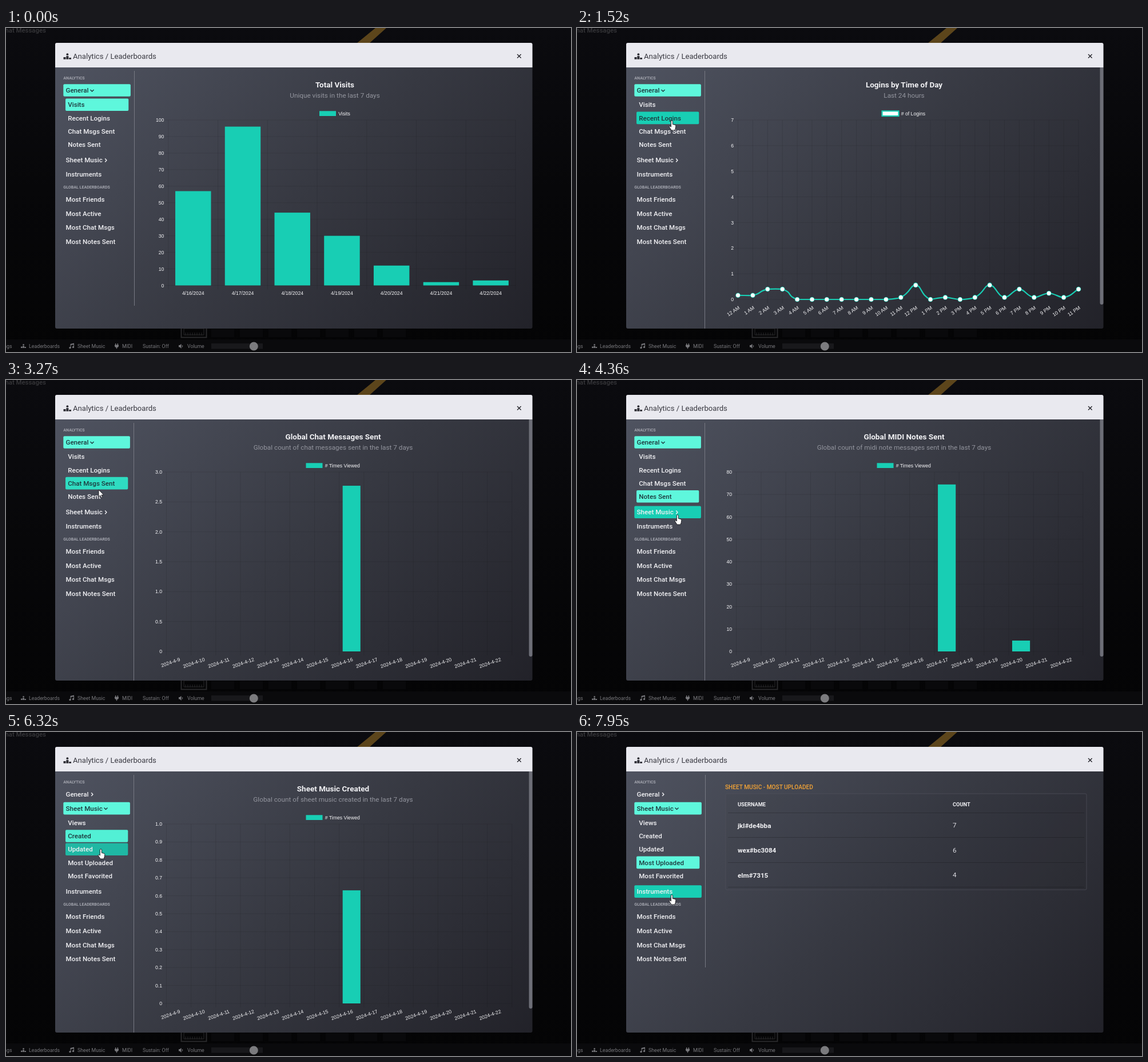
An HTML page that plays this animation: 988 by 567 pixels, repeating every 8 s.

```html
<!DOCTYPE html>
<html lang="en">
<head>
<meta charset="utf-8">
<title>Analytics / Leaderboards</title>
<style>
  html, body { margin: 0; width: 100%; height: 100%; overflow: hidden; background: #060608; }
  svg { display: block; width: 100%; height: 100%; }
  text { font-family: Roboto, sans-serif; white-space: pre; }
  .chart text { font-family: "Liberation Sans", Arial, sans-serif; font-size: 8.7px; fill: #f4f4f6; }
  .bar text { font-size: 8.8px; fill: #77777b; }
</style>
</head>
<body>
<svg viewBox="0 0 988 567">
  <defs>
    <linearGradient id="room" x2="0" y2="1">
      <stop offset="0" stop-color="#0b0b0f"/>
      <stop offset=".5" stop-color="#070709"/>
      <stop offset="1" stop-color="#040405"/>
    </linearGradient>
    <linearGradient id="body" gradientUnits="userSpaceOnUse" x1="180" y1="-26" x2="826" y2="621">
      <stop offset="0" stop-color="#4f5360"/>
      <stop offset=".5" stop-color="#373942"/>
      <stop offset="1" stop-color="#222229"/>
    </linearGradient>
    <symbol id="podium" viewBox="0 0 14 11" overflow="visible">
      <circle cx="7.1" cy="2" r="2"/>
      <path d="M5 5h4.2v6H5zM0 7h4.2v4H0zM10 8h4v3h-4z"/>
    </symbol>
  </defs>

  <rect width="988" height="567" fill="url(#room)"/>
  <path d="M613 27L646 0H665L635 27Z" fill="#5c451b"/>
  <text x="70" y="8" text-anchor="end" font-size="11.4" font-weight="500" fill="#38383b">Chat Messages</text>

  <g fill="none" stroke="#29292b">
    <rect x="306.5" y="520.5" width="44" height="21" stroke-width="2"/>
    <rect x="311" y="526" width="35" height="11" stroke-width="1"/>
    <path d="M314 538v-5m4 5v-5m4 5v-5m4 5v-5m4 5v-5m4 5v-5m4 5v-5m4 5v-5"/>
  </g>
  <path d="M359 534h40m10 0h40m10 0h40m10 0h40m10 0h40m10 0h40m10 0h40" stroke="#09090b" stroke-width="14"/>

  <g class="bar">
    <rect y="545" width="988" height="22" fill="#0a0a0c"/>
    <text x="10.5" y="560" text-anchor="end">Chat Msgs</text>
    <use href="#podium" x="26" y="553" width="9" height="7" fill="#77777b"/>
    <text x="40" y="560">Leaderboards</text>
    <g fill="#77777b">
      <path d="M112.5 553l6.5-1.6v7h-1v-4.400l-4.500 1.100v4.500h-1z"/>
      <circle cx="112" cy="559.6" r="1.700"/><circle cx="117.500" cy="558.400" r="1.700"/>
      <path d="M191 552h1.300v2.500h2.400V552h1.300v2.500h1v2q0 2.300-2.800 2.800v2h-1.400v-2q-2.800-.5-2.800-2.800v-2h1z"/>
      <path d="M302 555h2l2.500-2.300v8.200l-2.500-2.300h-2z"/>
    </g>
    <path d="M308 555q1.500 1.800 0 3.600" fill="none" stroke="#77777b"/>
    <text x="125" y="560">Sheet Music</text>
    <text x="203" y="560">MIDI</text>
    <text x="239" y="560">Sustain: Off</text>
    <text x="317" y="560">Volume</text>
    <rect x="359" y="552" width="90" height="9.500" fill="#18181b"/>
    <circle cx="433.300" cy="557" r="7.500" fill="#7b7b7e"/>
  </g>

  <rect x="86" y="26" width="834.500" height="500" rx="3" fill="url(#body)"/>
  <path d="M86 69V29q0-3 3-3H917.500q3 0 3 3V69z" fill="#e9e9ef"/>
  <use href="#podium" x="100.500" y="44" width="13.500" height="11" fill="#2c2c33"/>
  <text x="117" y="54.200" font-size="13.130" fill="#3a3a42">Analytics / Leaderboards</text>
  <path d="M894 46l6.600 6.600m0-6.600l-6.600 6.600" stroke="#26262c" stroke-width="1.400"/>
  <g id="live"></g>
</svg>

<script>
const LOOP = 8000, STEP = 108.9;
const MINT = [94, 247, 220], TEAL = [24, 206, 180];
const TOP = 161, live = document.getElementById('live');

const days = Array.from({ length: 14 }, (_, i) => `2024-4-${9 + i}`);
const hours = Array.from({ length: 24 }, (_, i) => `${i % 12 || 12} ${i < 12 ? 'AM' : 'PM'}`);
const week = Array.from({ length: 7 }, (_, i) => `4/${16 + i}/2024`);

const daily = (left, max, tick, bars) => ({
  left, max, tick, bars, right: 884.8, base: 475, labels: days, turn: -19,
  legend: '# Times Viewed', legendX: 524.5
});

const views = [
  { at: -2000, group: 'General', item: 'Visits', title: 'Total Visits', sub: 'Unique visits in the last 7 days',
    divider: 486, wide: true,
    chart: { left: 283.9, right: 891, base: 450.5, max: 100, tick: 10, labels: week, turn: 0,
      bars: { 0: 57, 1: 96, 2: 44, 3: 30, 4: 12, 5: 2, 6: 3 }, legend: 'Visits', legendX: 548 } },
  { at: 1504, group: 'General', item: 'Recent Logins', title: 'Logins by Time of Day', sub: 'Last 24 hours',
    chart: { left: 281.5, right: 877, base: 475, max: 7, tick: 1, labels: hours, turn: -34,
      line: [...'225500000001701017151315'].map(Number), legend: '# of Logins', legendX: 533.5 } },
  { at: 2793, group: 'General', item: 'Chat Msgs Sent', title: 'Global Chat Messages Sent',
    sub: 'Global count of chat messages sent in the last 7 days', chart: daily(280.5, 3, .5, { 7: 3 }) },
  { at: 3783, group: 'General', item: 'Notes Sent', title: 'Global MIDI Notes Sent',
    sub: 'Global count of midi note messages sent in the last 7 days', chart: daily(278.6, 80, 10, { 8: 77, 11: 5 }) },
  { at: 5013, group: 'Sheet Music', item: 'Views', title: 'Sheet Music Views',
    sub: 'Global views in the last 7 days', chart: daily(273.5, 7, 1, { 7: 7, 8: 6, 9: 1, 11: 3, 12: 1, 13: 2 }) },
  { at: 6096, group: 'Sheet Music', item: 'Created', title: 'Sheet Music Created',
    sub: 'Global count of sheet music created in the last 7 days', chart: daily(280.5, 1, .1, { 7: 1 }) },
  { at: 6620, group: 'Sheet Music', item: 'Updated', title: 'Sheet Music Updated',
    sub: 'Global count of sheet music updated in the last 7 days', chart: daily(280.5, 1, .1, { 7: 1, 12: 1 }) },
  { at: 7300, group: 'Sheet Music', item: 'Most Uploaded', divider: 412, wide: true,
    table: [['jkl#de4bba', 7], ['wex#bc3084', 6], ['elm#7315', 4]] }
];

const menu = {
  General: ['Visits', 'Recent Logins', 'Chat Msgs Sent', 'Notes Sent'],
  'Sheet Music': ['Views', 'Created', 'Updated', 'Most Uploaded', 'Most Favorited'],
  Instruments: []
};
const boards = ['Most Friends', 'Most Active', 'Most Chat Msgs', 'Most Notes Sent'];

// Pointer path: time, x, y
const path = [
  [0, 54, 580], [110, 54, 566], [430, 90, 450], [870, 128, 330], [1200, 150, 225], [1420, 166, 162],
  [2300, 167, 163], [2600, 164, 178], [3150, 163, 189], [3267, 162, 192], [3500, 162, 200],
  [3900, 163, 204], [4250, 176, 234], [4350, 176, 236], [5340, 176, 236], [5900, 166, 184],
  [6150, 166, 184], [6316, 166, 205], [6700, 166, 206], [7100, 166, 227], [7450, 166, 228],
  [7780, 166, 285], [8000, 166, 285]
];

function pointer(t) {
  const i = Math.max(1, path.findIndex(p => p[0] >= t));
  const [t0, x0, y0] = path[i - 1], [t1, x1, y1] = path[i];
  const u = Math.max(0, (t - t0) / (t1 - t0)), e = u * u * (3 - 2 * u);
  return [x0 + (x1 - x0) * e, y0 + (y1 - y0) * e];
}

const viewAt = t => views.findLast(v => v.at <= t);

function rowsFor(group) {
  const rows = [];
  let y = 109;
  for (const [label, kids] of Object.entries(menu)) {
    rows.push({ label, y, parent: kids.length > 0 });
    if (label === group) {
      kids.forEach((kid, i) => rows.push({ label: kid, y: y + 25.2 + i * 23.2, child: true }));
      y += 4.9 + kids.length * 23.2;
    }
    y += 24.6;
  }
  rows.push({ heading: 'GLOBAL LEADERBOARDS', y: y - 2 });
  boards.forEach((label, i) => rows.push({ label, y: y + 19.6 + i * 24.6 }));
  return rows;
}

function hit(t) {
  const [x, y] = pointer(t);
  if (x < 100 || x > 217) return null;
  const row = rowsFor(viewAt(t).group).find(r => r.label && Math.abs(r.y - y) < 10.8);
  return row ? row.label : null;
}

// Hover fades over 100 ms: share of recent moments spent on the row
function hoverLevel(label, t) {
  let n = 0;
  for (let k = 0; k < 6; k++) if (hit(t - k * 20) === label) n++;
  return n / 6;
}

const text = (x, y, s, size, fill, extra = '') =>
  `<text x="${x}" y="${y + size * .355}" font-size="${size}" fill="${fill}" ${extra}>${s}</text>`;
const rect = (x, y, w, h, fill, extra = '') =>
  `<rect x="${x}" y="${y}" width="${w}" height="${h}" fill="${fill}" ${extra}/>`;
const mix = (a, b, u) => `rgb(${a.map((v, i) => Math.round(v + (b[i] - v) * u))})`;
const MID = 'text-anchor="middle"', END = 'text-anchor="end"';

function sidebar(view, t) {
  const cut = view.wide ? 0 : 1;
  let out = text(100.3, 87, 'ANALYTICS', 7.1, '#a3a5ae', 'font-weight="700"');
  for (const r of rowsFor(view.group)) {
    if (r.heading) {
      out += text(100.3, r.y, r.heading, 7.1, '#a3a5ae', 'font-weight="700"');
      continue;
    }
    const active = r.label === view.group || r.label === view.item;
    const h = hoverLevel(r.label, t), x = r.child ? 104 : 100.3;
    const w = (r.child ? 110.3 : 117.6) - cut, ink = active ? '#1d383d' : '#f1f1f4';
    if (active || h) {
      out += rect(x, r.y - 10.8, w, 21.6, active ? mix(MINT, TEAL, h) : mix(TEAL, TEAL, 0),
        `rx="2" opacity="${active ? 1 : h}"`);
    }
    out += text(x + 4.2, r.y, r.label, 11.6, ink, 'font-weight="500"');
    if (r.parent) {
      const cx = r.label === 'General' ? 150.5 : 174.5;
      const d = active ? `M${cx - 3} ${r.y - 1}l3 3 3-3` : `M${cx - 1.3} ${r.y - 2.700}l2.700 2.900-2.700 2.900`;
      out += `<path d="${d}" fill="none" stroke="${ink}" stroke-width="1.400"/>`;
    }
  }
  const end = view.divider || 526;
  out += rect(224 - cut, 75, 1, end - 75, '#777983');
  if (cut) out += `<path d="M914.500 69h6v412q0 3-3 3t-3-3z" fill="#6d6e77"/>`;
  return out;
}

function curve(c, p) {
  const step = (c.right - c.left) / (c.line.length - 1);
  const pts = c.line.map((v, i) => [c.left + i * step, c.base - v / c.max * (c.base - TOP)]);
  const put = ([x, y]) => `${x.toFixed(1)} ${(c.base - (c.base - Math.min(c.base, Math.max(TOP, y))) * p).toFixed(2)}`;
  const ctrl = pts.map((b, i) => {
    const a = pts[i - 1] || b, n = pts[i + 1] || b;
    const d0 = Math.hypot(b[0] - a[0], b[1] - a[1]), d1 = Math.hypot(n[0] - b[0], n[1] - b[1]);
    const k = .4 / (d0 + d1);
    return [-d0, d1].map(d => [0, 1].map(j => b[j] + k * d * (n[j] - a[j])));
  });
  let d = 'M' + put(pts[0]);
  for (let i = 1; i < pts.length; i++) d += `C${put(ctrl[i - 1][1])} ${put(ctrl[i][0])} ${put(pts[i])}`;
  const dots = pts.map(q => `<path d="M${put(q)}h0"/>`).join('');
  return `<path d="${d}" fill="none" stroke="#18ceb4" stroke-width="2.200"/>
    <g stroke-linecap="round" stroke="#18ceb4" stroke-width="8.600">${dots}</g>
    <g stroke-linecap="round" stroke="#fff" stroke-width="7">${dots}</g>`;
}

function chart(c, age) {
  const p = 1 - (1 - Math.min(1, age / 1000)) ** 4;
  const n = c.labels.length, slot = (c.right - c.left) / (c.line ? n - 1 : n);
  const count = Math.round(c.max / c.tick), height = c.base - TOP;
  let grid = '', out = '';
  for (let i = 0; i <= count; i++) {
    const y = c.base - i / count * height;
    grid += `M${c.left - 7} ${y}H${c.right}`;
    out += text(c.left - 7.5, y, i && (i * c.tick).toFixed(c.tick < 1 ? 1 : 0), 8.7, '', END);
  }
  for (let i = 0; i <= (c.line ? n - 1 : n); i++) grid += `M${c.left + i * slot} ${TOP}V${c.base + 7}`;
  c.labels.forEach((s, i) => {
    const x = c.left + (c.line ? i : i + .5) * slot;
    out += c.turn
      ? `<g transform="translate(${x + 2} 488.500) rotate(${c.turn})">${text(0, 0, s, 8.7, '', END)}</g>`
      : text(x, 464, s, 8.7, '', MID);
  });
  for (const [i, v] of Object.entries(c.bars || {})) {
    const h = v / c.max * height * p;
    out += rect(c.left + (+i + .14) * slot, c.base - h, slot * .72, h, '#18ceb4');
  }
  if (c.line) out += curve(c, p);
  out += rect(c.legendX, 145.3, 29, 8.7, c.line ? '#fff' : '#18ceb4', c.line ? 'stroke="#18ceb4" stroke-width="2.200"' : '');
  out += text(c.legendX + 33.2, 149.7, c.legend, 8.7, '');
  return `<g class="chart"><path d="${grid}" stroke="#000" stroke-opacity=".1"/>${out}</g>`;
}

function table(rows) {
  const bold = 'font-weight="700"', medium = 'font-weight="500"';
  let out = text(259, 96.5, 'SHEET MUSIC - MOST UPLOADED', 10.15, '#f2a336', medium);
  out += rect(260, 108, 631, 168, '#000', 'rx="2" fill-opacity=".03" stroke="#50525c" stroke-opacity=".7"');
  out += text(281, 126.5, 'USERNAME', 9.25, '#f1f1f4', bold) + text(657, 126.5, 'COUNT', 9.25, '#f1f1f4', bold);
  rows.forEach(([name, n], i) => {
    const y = 163.3 + i * 43.5;
    out += text(281, y + .5, name, 11.7, '#f1f1f4', bold) + text(657, y, n, 11.7, '#dcdce2');
  });
  return out + '<path d="M264 141.500H887M264 184.500H887M264 228.500H887M264 271.500H887" stroke="#000" stroke-opacity=".22"/>';
}

function cursor(t) {
  if (t < 100) return '';
  const [x, y] = pointer(t);
  const d = hit(t)
    ? 'M-1.700 1.400A1.500 1.500 0 0 1 1.300 1.400V6.500L5 7.300Q6.900 7.800 6.800 9.600L6.200 13.500 5 17H-1L-4.600 11.200Q-5 9.800-3.600 9.600L-1.700 11Z'
    : 'M0 0V12.500L2.900 9.900 4.900 14.300 6.800 13.400 4.900 9.200H8.900Z';
  return `<path transform="translate(${x} ${y})" d="${d}" fill="#fff" stroke="#15151a" stroke-width=".9"/>`;
}

function render(t) {
  const v = viewAt(t), cx = v.wide ? 575 : 572;
  const main = v.table ? table(v.table)
    : text(cx, 99, v.title, 13.5, '#f1f1f4', MID + ' font-weight="700"')
      + text(cx, 117.5, v.sub, 11.75, '#93959e', MID)
      + chart(v.chart, t - v.at);
  live.innerHTML = sidebar(v, t) + main + cursor(t);
}

let shown = -1;
function tick() {
  const step = Math.floor((performance.now() % LOOP + 6) / STEP);
  if (step !== shown) render((shown = step) * STEP);
  requestAnimationFrame(tick);
}
tick();
</script>
</body>
</html>
```
